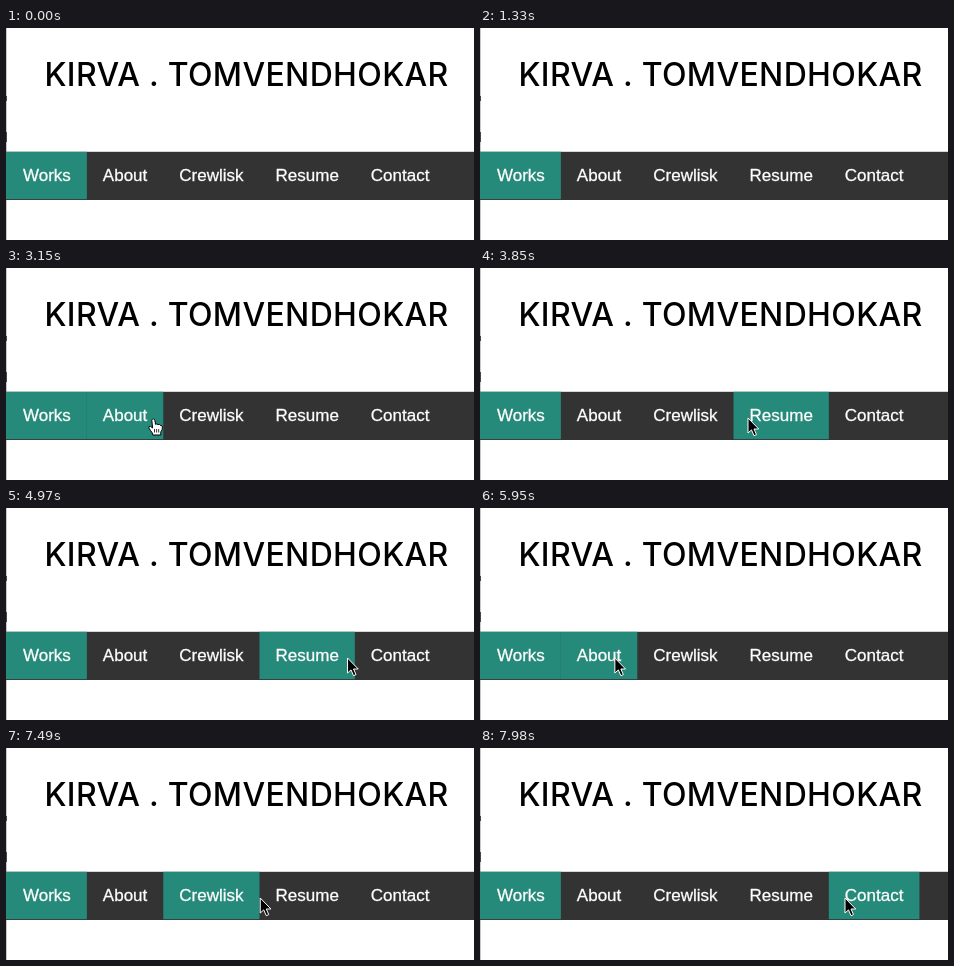
An HTML page that plays this animation: 468x212 px, repeating every 8 s.

```html
<!DOCTYPE html>
<html lang="en">
<head>
<meta charset="utf-8">
<title>Navigation bar</title>
<style>
html, body { margin: 0; width: 100%; height: 100%; overflow: hidden; background: #fff; }
svg { display: block; }
.title { font: 500 32px Inter, "Open Sans", sans-serif; letter-spacing: .35px; }
.link { font: 17px "Liberation Sans", Arial, sans-serif; fill: #fff; stroke: #fff; stroke-width: .3px; }
</style>
</head>
<body>
<svg width="468" height="212" viewBox="0 0 468 212">
  <path d="M.5 0V212" stroke="#c4caca"/>
  <path d="M.5 68v5M.5 104v10" stroke="#444"/>
  <text class="title" x="38.5" y="58">KIRVA . TOMVENDHOKAR</text>
  <rect y="123.8" width="468" height="48.2" fill="#333"/>
  <g id="nav"></g>
  <g id="cursor">
    <path id="arrow" d="M0 0V15L3.5 11.9 6 17.7 8.5 16.6 6 11H10.7Z" fill="#000" stroke="#fff"/>
    <g id="hand" fill="#fff" stroke="#000" transform="translate(2 1)">
      <path d="M-2.2 1.2C-2-.6 .6-.6 .8 1.2L1.6 5.4Q3 4.2 4 5.6 5.8 4.8 6.3 6.4 8.2 6 8.4 8 8.6 11 6.8 13V16H-1.2Q-1.5 13.5-3.4 11.6L-5.2 9Q-5.6 7-3.5 7.4L-1.4 9Z"/>
      <path d="M.5 10v3.5M2.6 10v3.5M4.7 10v3.5" stroke-width=".8"/>
    </g>
  </g>
</svg>
<script>
const LOOP = 8000, STEP = 70, AWAKE = 2800;
const PAD = 16, HOVER_Y = 150;

// Pointer moves: start, end, x, and y where it is not the hover height
const moves = [
  [210, 770, 176], [910, 1330, 101, 214],
  [1330, 1400, 208, 214], [1400, 1680, 122],
  [1750, 2030, 44], [2030, 2240, 168], [2310, 2520, 107], [2660, 2870, 145],
  [2940, 3150, 146], [3150, 3850, 268], [3850, 4480, 400],
  [4550, 5110, 310], [5250, 5530, 215], [5670, 6020, 103], [6090, 6510, 48],
  [6720, 7560, 283], [7560, 7980, 365]
];

const $ = id => document.getElementById(id);
const show = (el, on) => el.setAttribute('visibility', on ? 'visible' : 'hidden');
const make = (tag, attrs) => {
  const el = document.createElementNS('http://www.w3.org/2000/svg', tag);
  for (const key in attrs) el.setAttribute(key, attrs[key]);
  return $('nav').appendChild(el);
};

let edge = 1;
const tabs = ['Works', 'About', 'Crewlisk', 'Resume', 'Contact'].map((label, i) => {
  const left = edge, x = i ? left : 0;
  const rect = make('rect', { x, y: 123.8, height: 47.4, fill: '#268a7b' });
  const text = make('text', { class: 'link', x: left + PAD, y: 153 });
  text.textContent = label;
  edge += text.getComputedTextLength() + 2 * PAD;
  rect.setAttribute('width', edge - x);
  return { rect, left, right: edge };
});

function pointer(t) {
  let x0 = -20, y0 = 214;
  for (const [start, end, x1, y1 = HOVER_Y] of moves) {
    if (t <= end) {
      const k = Math.max(0, (t - start) / (end - start)) ** 1.5;
      const slow = t < start || Math.abs(x1 - x0) / (end - start) < .1;
      return { x: x0 + (x1 - x0) * k, y: y0 + (y1 - y0) * k, slow };
    }
    [x0, y0] = [x1, y1];
  }
  return { x: x0, y: y0, slow: true };
}

function draw(now) {
  const t = Math.floor(now % LOOP / STEP) * STEP;
  const { x, y, slow } = pointer(t);
  const awake = t >= AWAKE, hand = awake && slow;
  tabs.forEach(({ rect, left, right }, i) =>
    show(rect, i === 0 || awake && x > left + 1 && x <= right + 1));
  $('cursor').setAttribute('transform', `translate(${x} ${y})`);
  show($('arrow'), !hand);
  show($('hand'), hand);
}

const begin = performance.now();
function tick() {
  draw(performance.now() - begin);
  requestAnimationFrame(tick);
}
tick();
</script>
</body>
</html>
```
